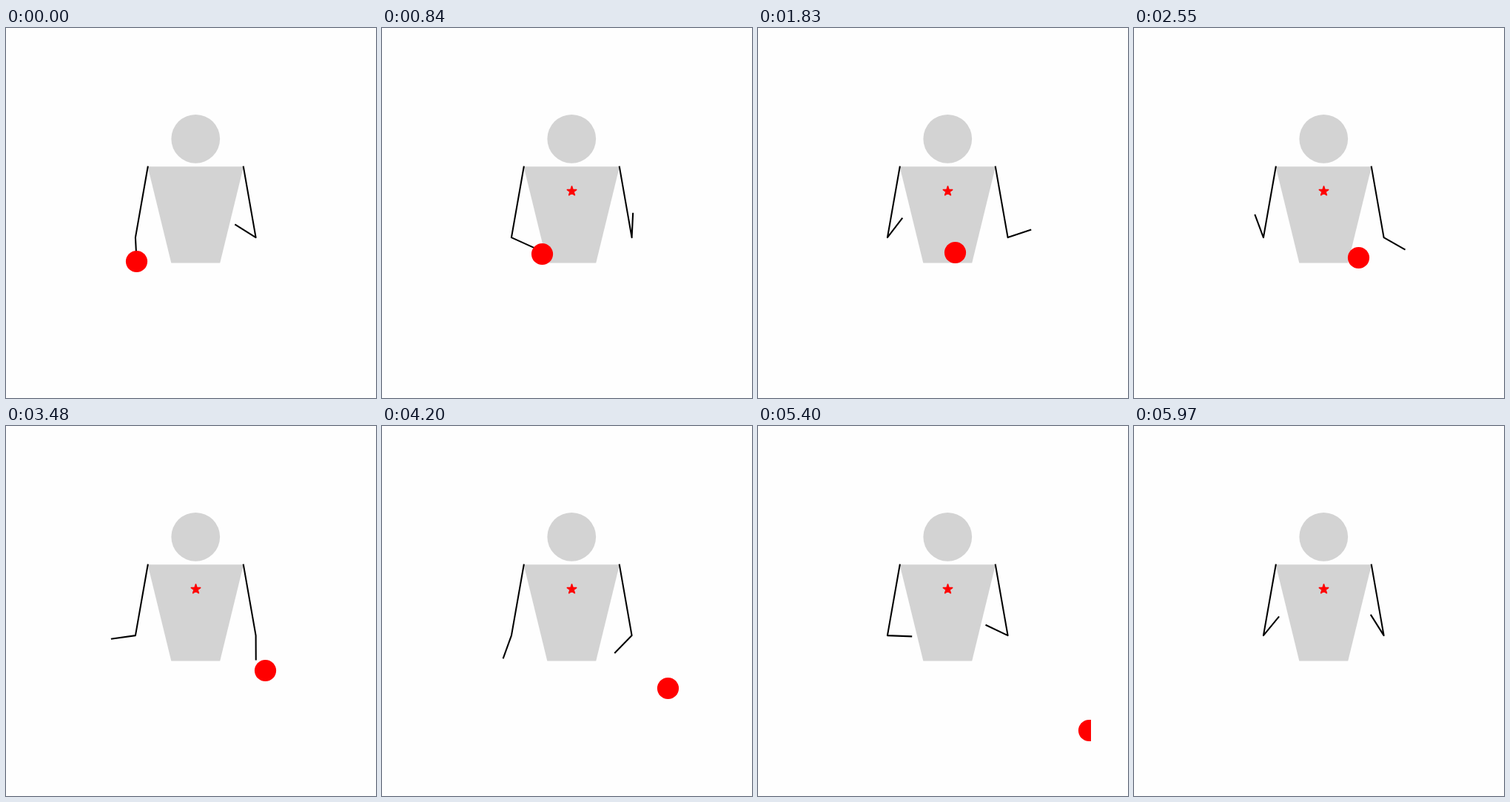
An HTML page with a canvas that plays this animation: 500 px wide and 500 px high, repeating every 6000 ms.

```html
<!DOCTYPE html>
<html lang="en">
<head>
<meta charset="utf-8">
<title>Throw</title>
<style>
  html, body { margin: 0; height: 100%; overflow: hidden; background: #fefefe; }
  canvas { display: block; }
</style>
</head>
<body>
<canvas id="stage" width="500" height="500"></canvas>
<script>
const ctx = document.getElementById('stage').getContext('2d');
const STEP = 30, STEPS = 200, RELEASE = 10;
const UNIT = 32.3, CENTER = 256.25, RIGHT_EDGE = 450;
const SHOULDER_Y = 187.7, ELBOW_Y = 283.1;

const snap = v => Math.floor(v) + 0.5;

function path(points) {
  ctx.beginPath();
  points.forEach(([x, y]) => ctx.lineTo(x, y));
}

function disc(x, y, r, color) {
  ctx.fillStyle = color;
  ctx.beginPath();
  ctx.arc(x, y, r, 0, 2 * Math.PI);
  ctx.fill();
}

// side is -1 for the left arm and 1 for the right; returns the hand
function arm(side, degrees) {
  const a = degrees * Math.PI / 180;
  const elbowX = CENTER + side * 81.35;
  const hand = [elbowX + UNIT * Math.cos(a), ELBOW_Y - UNIT * Math.sin(a)];
  path([[CENTER + side * 64.6, SHOULDER_Y], [elbowX, ELBOW_Y], hand]);
  ctx.strokeStyle = '#000';
  ctx.lineWidth = 2.08;
  ctx.lineCap = 'square';
  ctx.lineJoin = 'round';
  ctx.stroke();
  return hand;
}

function body() {
  disc(CENTER, 149.8, 32.9, '#d3d3d3');
  path([[191.5, 187.3], [321, 187.3], [289.2, 317.5], [223.3, 317.5]]);
  ctx.fill();
}

function star(x, y, r) {
  path(Array.from({ length: 10 }, (_, i) => {
    const a = i * Math.PI / 5, d = i % 2 ? r * 0.382 : r;
    return [x + d * Math.sin(a), y - d * Math.cos(a)];
  }));
  ctx.closePath();
  ctx.fillStyle = ctx.strokeStyle = '#f00';
  ctx.lineWidth = 1.39;
  ctx.lineJoin = 'bevel';
  ctx.fill();
  ctx.stroke();
}

function ball(n, hand) {
  const [x, y] = n < RELEASE
    ? hand
    : [174.5 + 1.516 * n, 302.6 + 0.0064 * (n - 49.7) ** 2];
  ctx.save();
  ctx.beginPath();
  ctx.rect(0, 0, RIGHT_EDGE, 500);
  ctx.clip();
  disc(snap(x), snap(y), 14.6, '#f00');
  ctx.restore();
}

function draw(now) {
  const n = Math.floor(now / STEP) % STEPS;
  ctx.fillStyle = '#fefefe';
  ctx.fillRect(0, 0, 500, 500);
  body();
  const hand = arm(-1, -87 + 2.19 * n + 0.00156 * n * n);
  arm(1, 148 - 2.205 * n + 0.00134 * n * n);
  ball(n, hand);
  if (n >= RELEASE) star(256.5, 220.5, 6.94);
}

const start = performance.now();
function tick() {
  draw(performance.now() - start);
  requestAnimationFrame(tick);
}
tick();
</script>
</body>
</html>
```
